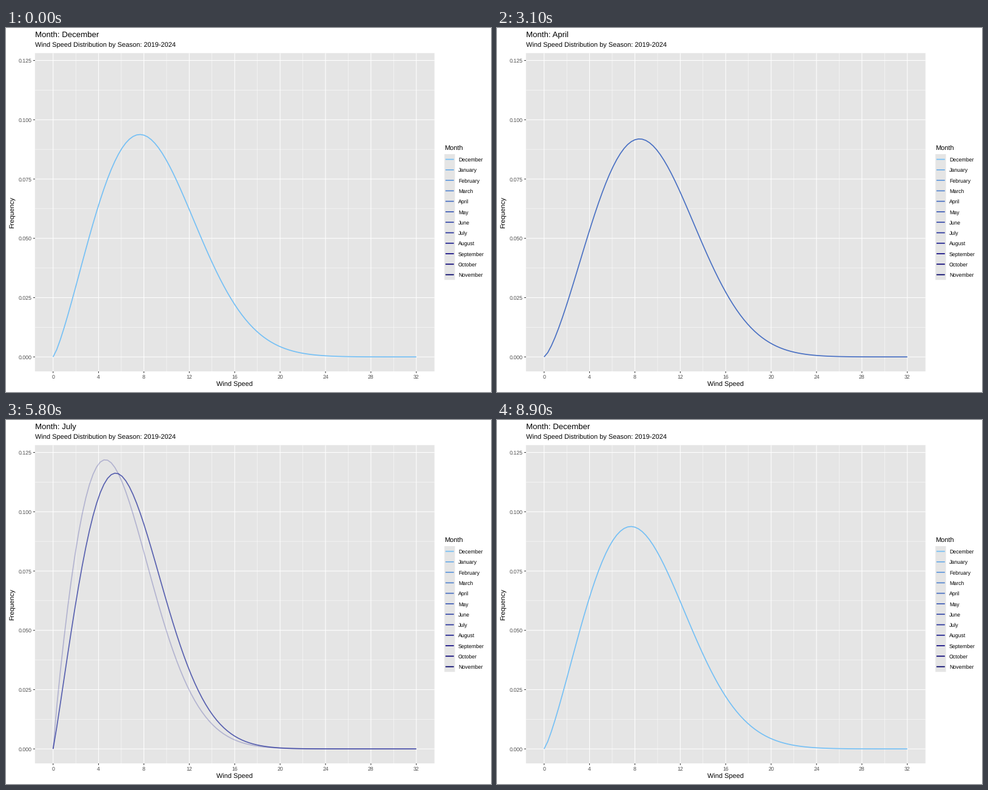
Write a matplotlib script that moves like this. It is 800 px wide and 600 px high and loops after 10 s.

```python
import math

import numpy as np
import matplotlib.pyplot as plt
from matplotlib.animation import FuncAnimation
from matplotlib.patches import Rectangle

plt.rcParams["font.family"] = "Liberation Sans"
plt.rcParams["text.hinting"] = "none"

W, H, DPI = 800, 600, 100
PT = 72 / DPI  # points per pixel

LEFT, RIGHT, TOP, BOTTOM = 47.75, 706.75, 41.4, 566.0
MAX_SPEED, MAX_FREQ = 32, 0.122
# The data fills the panel except for a 5% margin on every side
X_SCALE = (RIGHT - LEFT) / (1.1 * MAX_SPEED)
Y_SCALE = (BOTTOM - TOP) / (1.1 * MAX_FREQ)
KEY_X, KEY_Y, KEY = 723.2, 207.9, 17.28
GREY, TICK, TICK_TEXT = "#E5E5E5", "#333333", "#4D4D4D"
THIN, THICK, CURVE = 0.53, 1.07, 1.71  # line widths in pixels

MONTHS = ["December", "January", "February", "March", "April", "May", "June",
          "July", "August", "September", "October", "November"]
N = len(MONTHS)

# Weibull shape and scale at key months; the others lie in between
KEY_MONTHS = [0, 1, 2, 4, 6, 8, 9, 10]
SHAPES = [2.25, 2.22, 2.57, 2.38, 2.25, 1.90, 2.04, 2.10]
SCALES = [9.93, 10.68, 10.96, 10.57, 8.31, 6.81, 8.50, 8.85]

# Timing in frames: a constant hold, then a fade that gets shorter
FIRST_FADE, HOLD = 3, 4
FADES = [5] * 5 + [4, 5] + [4] * 5


def px(speed):
    return LEFT + X_SCALE * (speed + 0.05 * MAX_SPEED)


def py(freq):
    return BOTTOM - Y_SCALE * (freq + 0.05 * MAX_FREQ)


def month_color(i):
    rgb = np.array([117, 192, 245]) - i * np.array([11, 20.1, 12.6])
    return tuple(np.clip(rgb, 0, 255) / 255)


def density(v, i):
    shape = np.interp(i, KEY_MONTHS, SHAPES, period=N)
    scale = np.interp(i, KEY_MONTHS, SCALES, period=N)
    r = v / scale
    return shape / scale * r ** (shape - 1) * np.exp(-r ** shape)


fig = plt.figure(figsize=(W / DPI, H / DPI), dpi=DPI, facecolor="white")
ax = fig.add_axes([0, 0, 1, 1])
ax.set_xlim(0, W)
ax.set_ylim(H, 0)
ax.axis("off")


def stroke(x, y, color, width, z=2):
    line, = ax.plot(x, y, color=color, lw=width * PT, zorder=z, snap=False,
                    solid_capstyle="butt", solid_joinstyle="round")
    return line


def hline(y, x1, x2, color, width):
    stroke([x1, x2], [y, y], color, width)


def vline(x, y1, y2, color, width):
    stroke([x, x], [y1, y2], color, width)


def label(x, y, s, size, color="black", ha="left", **kw):
    return ax.text(x, y, s, fontsize=size * PT, color=color, ha=ha,
                   va="baseline", **kw)


def side_label(x, center, s, **kw):
    """Small label whose digits or capitals are centred on a height."""
    label(x, math.ceil(center + 3.15), s, 8.8, **kw)


def box(x, y, w, h):
    ax.add_patch(Rectangle((x, y), w, h, fc=GREY, ec="none", zorder=1,
                           snap=False))


def draw_panel():
    box(LEFT, TOP, RIGHT - LEFT, BOTTOM - TOP)
    for v in range(2, MAX_SPEED, 4):
        vline(px(v), TOP, BOTTOM, "white", THIN)
    for i in range(5):
        hline(py(0.025 * (i + 0.5)), LEFT, RIGHT, "white", THIN)
    for v in range(0, MAX_SPEED + 1, 4):
        vline(px(v), TOP, BOTTOM, "white", THICK)
        vline(px(v), BOTTOM, BOTTOM + 2.75, TICK, THICK)
        label(px(v), 578, str(v), 8.8, TICK_TEXT, "center")
    for i in range(6):
        y = py(0.025 * i)
        hline(y, LEFT, RIGHT, "white", THICK)
        hline(y, LEFT - 2.75, LEFT, TICK, THICK)
        side_label(42.8, y, f"{0.025 * i:.3f}", color=TICK_TEXT, ha="right")
    label((LEFT + RIGHT) / 2, 591, "Wind Speed", 11, ha="center")
    label(13.3, (TOP + BOTTOM) / 2, "Frequency", 11, ha="center",
          rotation=90, rotation_mode="anchor")
    label(LEFT, 32, "Wind Speed Distribution by Season: 2019-2024", 11)


def draw_legend():
    label(KEY_X, 202, "Month", 11)
    box(KEY_X, KEY_Y, KEY, KEY * N)
    for i, name in enumerate(MONTHS):
        y = KEY_Y + KEY * (i + 0.5)
        hline(y, KEY_X + 0.1 * KEY, KEY_X + 0.9 * KEY, month_color(i), CURVE)
        side_label(KEY_X + KEY + 5.5, y, name)


draw_panel()
draw_legend()
title = label(LEFT, 15, "", 13.2)
speeds = np.linspace(0, MAX_SPEED, 101)
lines = [stroke(px(speeds), py(density(speeds, i)), month_color(i), CURVE, 3)
         for i in range(N)]


def state_at(frame):
    """Return the current month index and the progress towards the next."""
    start = FIRST_FADE
    for month, steps in enumerate(FADES):
        step = frame - start + 1
        if step < steps:
            return month, max(0, step) / steps
        start += steps - 1 + HOLD
    return 0, 0.0


def update(frame):
    month, t = state_at(frame)
    following = (month + 1) % N
    for line in lines:
        line.set_visible(False)
    for i, alpha in ((month, 1 - t), (following, t)):
        lines[i].set_alpha(alpha)
        lines[i].set_visible(alpha > 0)
    name = MONTHS[following if t >= 0.5 else month]
    title.set_text("Month: " + name)
    # Round capitals push the top-aligned title one pixel down
    title.set_y(16 if name[0] in "SO" else 15)
    return lines + [title]


anim = FuncAnimation(fig, update, frames=100, interval=100, repeat=True,
                     repeat_delay=0, blit=False)
plt.show()
```
